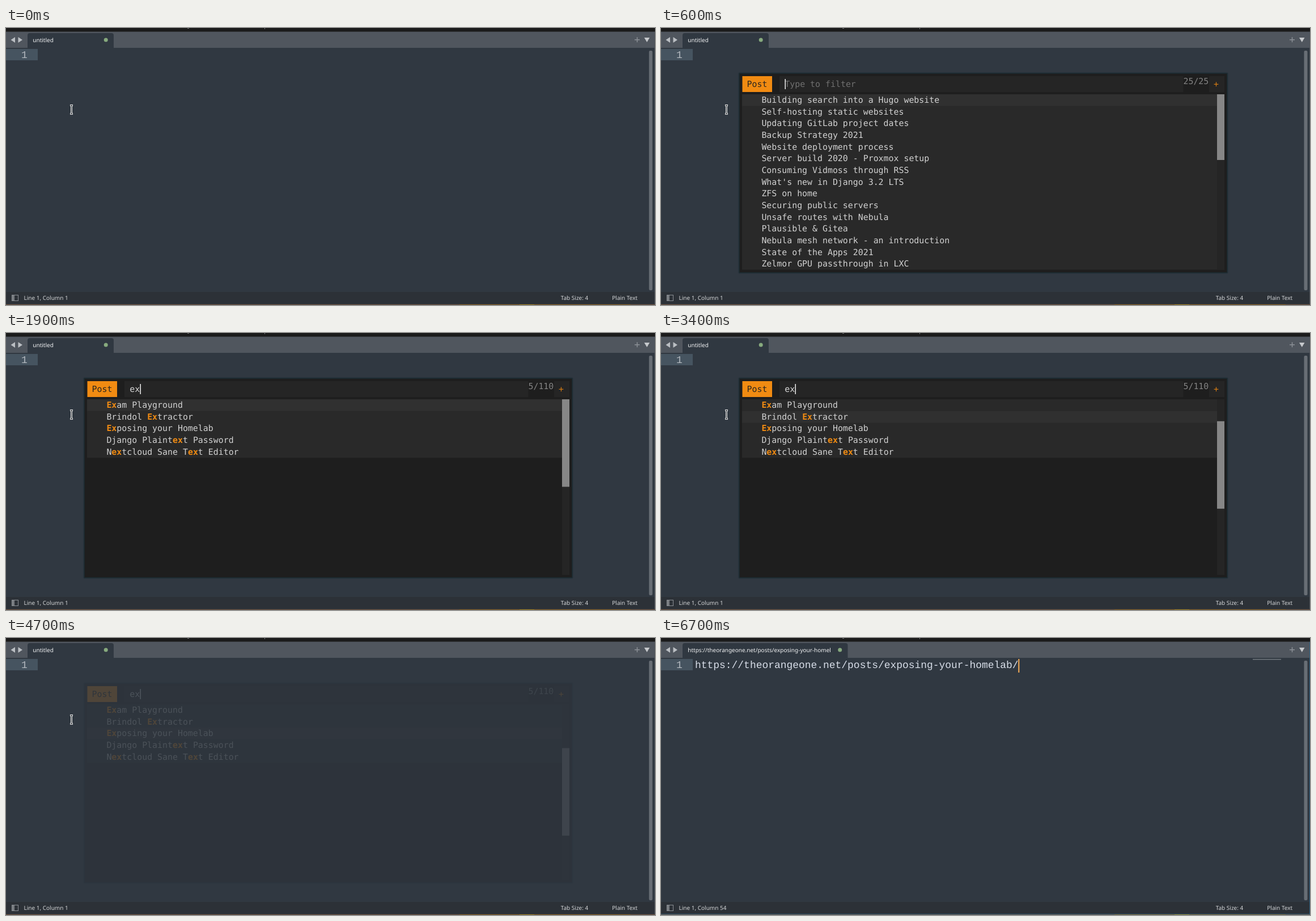
Write an HTML page with a canvas that moves like this. It is 1145 px wide and 489 px high and loops after 8 s.

```html
<!DOCTYPE html>
<html lang="en">
<head>
<meta charset="utf-8">
<title>Post picker</title>
<style>
  html, body { margin: 0; width: 100%; height: 100%; overflow: hidden; background: #303841; }
  canvas { position: absolute; left: 0; top: 0; display: block; }
</style>
</head>
<body>
<canvas id="editor" width="1145" height="489"></canvas>
<canvas id="menu" width="1145" height="489"></canvas>
<script>
const LOOP = 8000;
const UI = '10px "Noto Sans", "Open Sans", sans-serif';
const CODE = '17.95px "Liberation Mono", monospace';
const MENU = '14.9px "DejaVu Sans Mono", monospace';
const PITCH = 8.97, ROW = 20.64, LIST_TOP = 117, LIST_H = 310;
const ORANGE = '#f18b12', PANEL = '#1e1e1e', FIELD = '#252525';
const URL_TEXT = 'https://theorangeone.net/posts/exposing-your-homelab/';

const LISTS = {
  '': ['Building search into a Hugo website', 'Self-hosting static websites',
    'Updating GitLab project dates', 'Backup Strategy 2021', 'Website deployment process',
    'Server build 2020 - Proxmox setup', 'Consuming Vidmoss through RSS',
    "What's new in Django 3.2 LTS", 'ZFS on home', 'Securing public servers',
    'Unsafe routes with Nebula', 'Plausible & Gitea', 'Nebula mesh network - an introduction',
    'State of the Apps 2021', 'Zelmor GPU passthrough in LXC'],
  'e': ['Epics', 'Notes', 'Search', 'Lantern', 'Date Group', 'Support me', 'ZFS on home',
    'My Dotfiles', 'Why WireGuard', 'Traefik Basics', 'CVE-2019-19844', 'Exam Playground',
    'MarbleRigs 2018', 'Opening Port 22', 'Thornvelde 2017'],
  'ex': ['Exam Playground', 'Brindol Extractor', 'Exposing your Homelab',
    'Django Plaintext Password', 'Nextcloud Sane Text Editor']
};
const COUNTS = { '': '25/25', 'e': '95/110', 'ex': '5/110' };
const THUMBS = { '': 116, 'e': 43, 'ex': 154.5 };

const editorCanvas = document.getElementById('editor');
const menuCanvas = document.getElementById('menu');
const ed = editorCanvas.getContext('2d');
const mn = menuCanvas.getContext('2d');

function rect(c, x, y, w, h, color) {
  c.fillStyle = color;
  c.fillRect(x, y, w, h);
}

function text(c, str, x, y, color, font) {
  c.font = font;
  c.textRendering = 'geometricPrecision';
  c.fillStyle = color;
  c.fillText(str, x, y);
}

function poly(c, color, ...pts) {
  c.fillStyle = color;
  c.beginPath();
  for (let i = 0; i < pts.length; i += 2) c.lineTo(pts[i], pts[i + 1]);
  c.fill();
}

function round(c, x, y, w, h, r, color) {
  c.fillStyle = color;
  c.beginPath();
  c.roundRect(x, y, w, h, r);
  c.fill();
}

function drawPointer(c) {
  for (const [width, color] of [[3, '#f4f4f4'], [1, '#20252a']]) {
    const end = width > 1 ? 0.5 : 0;
    c.strokeStyle = color;
    c.lineWidth = width;
    c.beginPath();
    c.moveTo(113.5 - end, 136.5); c.lineTo(117.5 + end, 136.5);
    c.moveTo(115.5, 136.5); c.lineTo(115.5, 151.5);
    c.moveTo(113.5 - end, 151.5); c.lineTo(117.5 + end, 151.5);
    c.stroke();
  }
}

function drawTabs(c, right, title) {
  rect(c, 0, 0, 1145, 7, '#1b1b1b');
  rect(c, 320, 0, 3, 1, '#77797b');
  rect(c, 456, 0, 1, 2, '#77797b');
  rect(c, 0, 6.5, 1145, 28.5, '#50565e');
  poly(c, '#bbbfc3', 16, 16, 16, 26, 8.5, 21);
  poly(c, '#bbbfc3', 21.5, 16, 21.5, 26, 29, 21);
  round(c, 38, 9, right - 38, 27, [4, 4, 0, 0], '#303841');

  c.save();
  c.beginPath();
  c.rect(38, 9, right - 60, 26);
  c.clip();
  text(c, title, 47.3, 25, '#f2f3f4', UI);
  c.restore();

  c.fillStyle = '#87aa7e';
  c.beginPath();
  c.arc(right - 13.8, 21, 3.5, 0, 7);
  c.fill();
  rect(c, 1109, 20, 9, 1.5, '#8b9096');
  rect(c, 1112.8, 16.2, 1.5, 9, '#8b9096');
  poly(c, '#c6c9cc', 1126, 17, 1135.5, 17, 1130.8, 25);
}

function drawStatus(c, column) {
  rect(c, 0, 466, 1145, 21, '#2c3137');
  c.strokeStyle = '#8b8f94';
  c.lineWidth = 1;
  c.strokeRect(10.5, 471.5, 11, 10);
  rect(c, 11, 472, 4, 9, '#777b80');
  text(c, 'Line 1, Column ' + column, 31.5, 480, '#d3d5d7', UI);
  text(c, 'Tab Size: 4', 978.7, 480, '#d3d5d7', UI);
  text(c, 'Plain Text', 1069.3, 480, '#d3d5d7', UI);
}

function drawEdges(c, focus) {
  rect(c, 1144, 7, 1, 480, '#4b5056');
  rect(c, 0, 487, 1145, 1, '#3a3c3f');
  c.globalAlpha = focus;
  rect(c, 1144, 7, 1, 480, '#2f5f7d');
  rect(c, 0, 487, 1145, 1, '#2f5f7d');
  c.globalAlpha = 1;
  rect(c, 0, 488, 1145, 1, '#70543f');
  rect(c, 800, 488, 302, 1, '#8c6222');
  rect(c, 906, 488, 26, 1, '#a8861f');
}

function drawEditor(t) {
  const c = ed;
  const pasted = t >= 6600;
  const focus = t < 5800 ? 0 : t < 5900 ? 0.5 : 1;
  const tabRight = t < 6600 ? 190 : t < 6700 ? 260 : 329.5;
  rect(c, 0, 0, 1145, 489, '#303841');
  drawTabs(c, tabRight, pasted ? URL_TEXT.slice(0, 50) : 'untitled');

  rect(c, 0, 37, 56, 20, '#465460');
  text(c, '1', 27, 52.5, '#b4bac0', CODE);
  if (pasted) {
    text(c, URL_TEXT, 60, 52.5, '#d8dee9', CODE);
    rect(c, 1044, 37, 50, 1.5, '#72797f');
  }
  c.globalAlpha = focus;
  rect(c, pasted ? 630.3 : 59.5, 37, 2, 24, '#f9ae58');
  c.globalAlpha = 1;

  round(c, 1134.5, 40, 6, 423, 2, '#686e75');
  drawStatus(c, pasted ? URL_TEXT.length + 1 : 1);
  drawEdges(c, focus);
  if (t < 6100) drawPointer(c);
}

function drawEntry(c, query) {
  const count = COUNTS[query];
  const countX = 966.3 - count.length * PITCH;
  rect(c, 143.5, 85, 52.5, 28, ORANGE);
  text(c, 'Post', 151.5, 104, '#2a2520', MENU);
  rect(c, 209, 85, countX - 209, 28, FIELD);
  rect(c, 967, 85, 27, 28, FIELD);
  text(c, count, countX, 98.8, '#848484', MENU);
  text(c, '+', 975, 104, '#d67c14', MENU);
  text(c, query || 'Type to filter', 218.3, 104, query ? '#d6d6d6' : '#707070', MENU);
  rect(c, 218.5 + query.length * PITCH, 90, 1.5, 18, '#f2f2f2');
}

// Splits a row at each match and draws the matches bold.
function drawRow(c, label, query, y) {
  const parts = query ? label.split(new RegExp('(' + query + ')', 'i')) : [label];
  let x = 177.4;
  parts.forEach((part, i) => {
    const hit = i % 2;
    text(c, part, x, y, hit ? ORANGE : '#d2d2d2', (hit ? 'bold ' : '') + MENU);
    x += part.length * PITCH;
  });
}

function drawMenu(t) {
  const c = mn;
  const alpha = t < 500 ? 0 : t < 600 ? 0.5 : t < 4700 ? 1 : t < 4800 ? 0.16 : 0;
  menuCanvas.style.opacity = alpha;
  if (!alpha) return;

  const query = t < 1100 ? '' : t < 1900 ? 'e' : 'ex';
  const picked = t < 3400 ? 0 : t < 3500 ? 1 : 2;
  const rows = LISTS[query];
  c.clearRect(0, 0, 1145, 489);
  round(c, 136.5, 78.5, 864, 355, 2, 'rgba(24,42,49,.55)');
  rect(c, 138, 80, 861, 352, '#1a252a');
  rect(c, 139, 81, 859, 350, PANEL);
  drawEntry(c, query);

  rect(c, 143, LIST_TOP, 838, rows.length * ROW, '#292929');
  rect(c, 143, Math.round(LIST_TOP + picked * ROW), 838, 20.6, '#303030');
  rows.forEach((label, i) => drawRow(c, label, query, 132.2 + i * ROW));

  rect(c, 981, LIST_TOP, 13, LIST_H, FIELD);
  rect(c, 981, LIST_TOP + picked * 38.7, 13, THUMBS[query], '#868686');
}

function frame(now) {
  const t = now % LOOP;
  drawEditor(t);
  drawMenu(t);
  requestAnimationFrame(frame);
}

const start = performance.now();
const tick = () => frameAt(performance.now() - start);
function frameAt(elapsed) {
  const t = elapsed % LOOP;
  drawEditor(t);
  drawMenu(t);
  requestAnimationFrame(tick);
}
tick();
</script>
</body>
</html>
```
